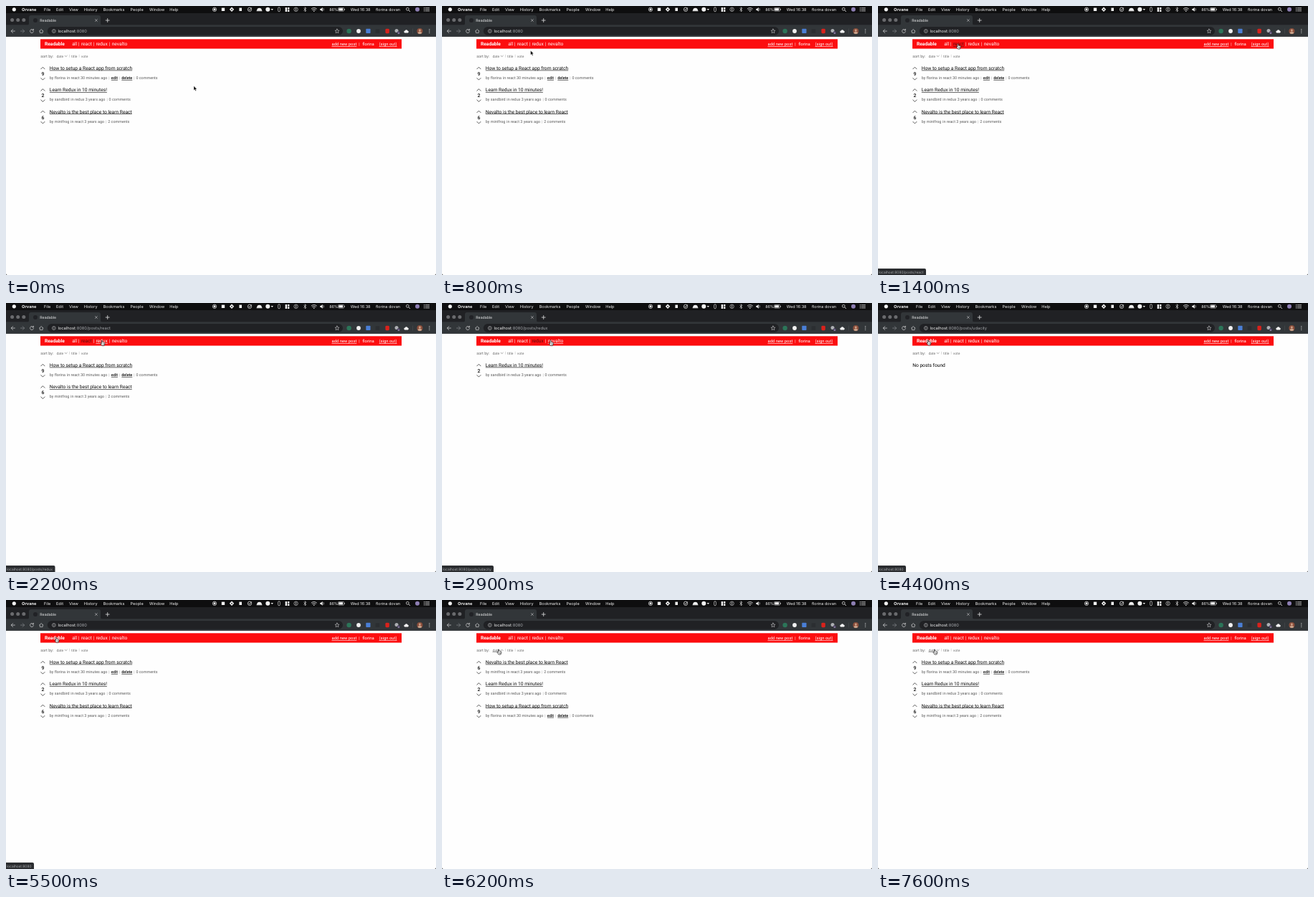
An HTML page that plays this animation: 600x375 px, repeating every 8 s.

```html
<!DOCTYPE html>
<html lang="en">
<head>
<meta charset="utf-8">
<title>Readable</title>
<style>
html, body { margin: 0; width: 100%; height: 100%; overflow: hidden; background: #fefefe; }
svg { display: block; width: 100vw; height: 100vh; }
text { font-family: Roboto, sans-serif; text-rendering: geometricPrecision; }
.ui text, text.ui { font-family: Inter, sans-serif; }
</style>
</head>
<body>
<svg id="stage" viewBox="0 0 600 375" xmlns="http://www.w3.org/2000/svg"></svg>
<script>
const LOOP = 8000, STEP = 100;
const NS = 'http://www.w3.org/2000/svg';
const stage = document.getElementById('stage');

function add(parent, tag, attrs, content) {
  const el = document.createElementNS(NS, tag);
  for (const k in attrs) el.setAttribute(k, attrs[k]);
  if (content !== undefined) el.textContent = content;
  parent.appendChild(el);
  return el;
}
const group = (p, attrs = {}) => add(p, 'g', attrs);
const rect = (p, x, y, width, height, fill, rx = 0) => add(p, 'rect', { x, y, width, height, fill, rx });
const dot = (p, cx, cy, r, fill) => add(p, 'circle', { cx, cy, r, fill });
const ring = (p, cx, cy, r, stroke, w = 0.7) =>
  add(p, 'circle', { cx, cy, r, stroke, fill: 'none', 'stroke-width': w });
const line = (p, d, stroke, w = 0.8) =>
  add(p, 'path', { d, stroke, fill: 'none', 'stroke-width': w, 'stroke-linecap': 'round', 'stroke-linejoin': 'round' });
const shape = (p, d, fill) => add(p, 'path', { d, fill });
const text = (p, x, y, size, fill, str, more = {}) =>
  add(p, 'text', { x, y, 'font-size': size, fill, ...more }, str);

// Text in a group with a thin rule below it, both in the group's colour
function linkText(p, x, y, size, fill, str, more = {}) {
  const g = group(p, { fill });
  const label = add(g, 'text', { x, y, 'font-size': size, ...more }, str);
  const rule = add(g, 'rect', { x, y: y + 0.8, width: label.getComputedTextLength(), height: 0.6 });
  return { g, rule };
}

function drawMenuBar() {
  const g = group(stage, { class: 'ui' }), w = '#f2f2f2';
  rect(g, 0, 0, 600, 10, '#0e0e0f');
  dot(g, 11.3, 4.8, 2.6, w);
  text(g, 22, 6.9, 5.7, w, 'Orvane', { 'font-weight': 700 });
  const menu = { File: 53, Edit: 70, View: 88, History: 108.7, Bookmarks: 135.7, People: 173.5, Window: 200, Help: 228.3 };
  for (const name in menu) text(g, menu[name], 6.9, 5.6, w, name);

  ring(g, 291, 4.8, 2.7, w);
  dot(g, 291, 4.8, 1.5, w);
  rect(g, 300.8, 2.6, 4.4, 4.4, w);
  shape(g, 'M315 1.6l3.2 3.2-3.2 3.2-3.2-3.2z', w);
  dot(g, 315, 4.8, 0.9, '#0e0e0f');
  rect(g, 325.4, 2.6, 3.6, 4.4, w);
  ring(g, 340, 4.8, 2.7, w);
  line(g, 'M338.6 4.8l1.2 1.2 2.6-3.2', w);
  shape(g, 'M350 6.6a3.5 3.8 0 0 1 7 0z', w);
  rect(g, 349.5, 6.3, 8, 1, w, 0.5);
  dot(g, 365.3, 4.8, 3, w);
  shape(g, 'M369.6 4h3.4l-1.7 2z', w);
  add(g, 'rect', { x: 379.6, y: 1.8, width: 2.8, height: 6, rx: 1.4, fill: 'none', stroke: w, 'stroke-width': 0.6 });
  rect(g, 389.7, 2, 2.4, 6, w);
  rect(g, 393, 2, 2.4, 2.6, w);
  rect(g, 393, 5.4, 2.4, 2.6, w);
  ring(g, 404.6, 4.8, 2.7, w, 0.6);
  line(g, 'M404.6 3.4v2.8', w, 0.7);
  line(g, 'M415.7 3.3l3.2 3-1.6 1.7V1.7l1.6 1.6-3.2 3', w, 0.6);
  line(g, 'M426.2 3.9q3.6-3 7.2 0M427.5 5.4q2.3-1.9 4.6 0', w, 0.8);
  dot(g, 429.8, 7.1, 0.8, w);
  shape(g, 'M438.3 3.8h1.4l2-1.7v5.6l-2-1.7h-1.4z', w);
  line(g, 'M443 3.3q1 1.5 0 3', w, 0.6);
  text(g, 451.2, 6.9, 5.4, w, '86%');
  add(g, 'rect', { x: 463.6, y: 2.5, width: 8, height: 4.6, rx: 0.8, fill: 'none', stroke: w, 'stroke-width': 0.5 });
  rect(g, 464.3, 3.2, 5.8, 3.2, w);
  rect(g, 472.2, 4, 0.7, 1.6, w);
  text(g, 480.8, 6.9, 5.6, w, 'Wed 16:38');
  text(g, 516, 6.9, 5.5, w, 'florina dovan');
  ring(g, 560.3, 4.3, 1.9, w);
  line(g, 'M561.8 5.8l1.9 1.9', w);
  dot(g, 574, 4.8, 3, '#8e7fb4');
  line(g, 'M583.2 2.7h1M585.6 2.7h5M583.2 4.8h1M585.6 4.8h5M583.2 6.9h1M585.6 6.9h5', w, 0.7);
}

function drawBrowser() {
  const g = group(stage, { class: 'ui' }), c = '#c9cacc';
  rect(g, 0, 10, 600, 17, '#202124');
  shape(g, 'M29 27q3 0 3-3v-8q0-3 3-3h94q3 0 3 3v8q0 3 3 3z', '#323639');
  rect(g, 0, 26.3, 600, 16.6, '#323639');
  [8.6, 16.7, 24.8].forEach(x => dot(g, x, 19.4, 2.5, '#6a6b6e'));
  dot(g, 41, 20, 3, '#212226');
  text(g, 47.3, 22, 5.2, '#e6e7e8', 'Readable');
  line(g, 'M124.4 18.5l3 3m0-3l-3 3', c, 0.6);
  line(g, 'M139.2 20h5M141.7 17.5v5', '#e0e0e0', 0.8);

  line(g, 'M12.3 35h-5m2.3-2.4l-2.4 2.4 2.4 2.4', c);
  line(g, 'M20.5 35h5m-2.3-2.4l2.4 2.4-2.4 2.4', '#7c7f83');
  line(g, 'M38 33.4a2.5 2.5 0 1 0 .5 2.2M38.4 32.2v1.7h-1.8', c);
  line(g, 'M46.5 35l2.7-2.5 2.7 2.5M47.3 34.6v2.9h3.8v-2.9', c, 0.7);
  rect(g, 57.8, 29.1, 412.2, 11.7, '#202124', 5.85);
  ring(g, 66.8, 35, 2.4, c, 0.6);
  line(g, 'M66.8 34.8v1.3M66.8 33.6v.05', c, 0.6);
  line(g, 'M462 32l.9 2 2.1.2-1.6 1.4.5 2.1-1.9-1.1-1.9 1.1.5-2.1-1.6-1.4 2.1-.2z', c, 0.6);

  dot(g, 478.6, 35, 3.2, '#2c7559');
  dot(g, 492, 35, 2.9, '#f1f1f1');
  rect(g, 502.3, 31.8, 6.2, 6.2, '#4a7fd6', 0.7);
  rect(g, 515.6, 32.2, 5.6, 5.6, '#2b2e31', 0.6);
  rect(g, 529.4, 31.8, 5.4, 6.4, '#d9221c', 1.4);
  dot(g, 545, 34.4, 2.5, '#aeb0b4');
  rect(g, 546, 35.6, 3.8, 3.4, '#4a3f63', 0.6);
  text(g, 546.8, 38.5, 3.2, '#fff', '0');
  shape(g, 'M556.3 37.4a1.5 1.5 0 0 1 .4-2.9a2.1 2.1 0 0 1 3.8 0a1.5 1.5 0 0 1 .3 2.9z', '#f4f4f4');
  rect(g, 567.6, 31.5, 0.4, 7, '#55585c');
  dot(g, 577.4, 35, 4, '#8b4f3c');
  shape(g, 'M574.4 37.7q3-4.6 6 0q-3 2.6-6 0z', '#c9a48c');
  dot(g, 577.4, 34, 1.4, '#d1a389');
  [32.7, 35, 37.3].forEach(y => dot(g, 590.8, y, 0.65, c));

  const url = text(g, 72.4, 37.1, 5.75, '#f1f1f1', 'localhost');
  return add(url, 'tspan', { fill: '#a3a6aa' }, ':8080');
}

function drawHeader() {
  rect(stage, 48, 46.25, 504, 13.25, '#fc0d0f');
  const y = 55.2, w = '#fff', bar = x => text(stage, x, y, 6.4, w, '|');
  text(stage, 54, y, 6.667, w, 'Readable', { 'font-weight': 700 });
  text(stage, 92.2, y, 6.667, w, 'all');
  [100.8, 121.9, 144].forEach(bar);
  const item = (x, s) => linkText(stage, x, y, 6.667, w, s);
  const links = { react: item(104.9, 'react'), redux: item(125.4, 'redux'), udacity: item(147.7, 'nevalto') };
  linkText(stage, 454.5, y, 5.833, w, 'add new post');
  text(stage, 492.2, y, 5.5, w, '|');
  text(stage, 497.3, y, 5.833, w, 'florina');
  linkText(stage, 520.6, y, 5.833, w, '(sign out)');

  const grey = '#757575';
  text(stage, 48.2, 71.6, 5.417, '#666', 'sort by:');
  links.date = linkText(stage, 70.4, 71.5, 5, grey, 'date');
  text(stage, 91, 71.5, 5, grey, 'title');
  text(stage, 104.8, 71.5, 5, grey, 'vote');
  [87.7, 101.6].forEach(x => text(stage, x, 71.3, 4.6, '#999', '|'));
  return links;
}

const posts = [
  { title: 'How to setup a React app from scratch', votes: 9, by: 'florina', when: 'in react 30 minutes ago', end: 141.3, count: 0, mine: true },
  { title: 'Learn Redux in 10 minutes!', votes: 2, by: 'sandbird', when: 'in redux 3 years ago', end: 138.4, count: 0 },
  { title: 'Nevalto is the best place to learn React', votes: 6, by: 'mintfrog', when: 'in react 3 years ago', end: 137, count: 2 }
];

function drawPost(p) {
  const g = group(stage), y = 102.1, grey = '#595959', ink = '#0a0a0a';
  const bar = x => text(g, x, y - 0.2, 5, '#999', '|');
  line(g, 'M48.8 87.8l2.6-2.6 2.6 2.6M48.8 100.5l2.6 2.6 2.6-2.6', '#333', 0.8);
  text(g, 51.4, 97, 6.8, ink, p.votes, { 'text-anchor': 'middle', 'font-weight': 500 });
  linkText(g, 60.8, 88.8, 6.667, ink, p.title);
  text(g, 60.8, y, 5.417, grey, 'by ' + p.by);
  text(g, p.end, y, 5.417, grey, p.when, { 'text-anchor': 'end' });
  let x = p.end + 2;
  bar(x);
  if (p.mine) {
    linkText(g, 146.8, y, 5.417, ink, 'edit', { 'font-weight': 500 });
    bar(157.8);
    linkText(g, 161.3, y, 5.417, ink, 'delete', { 'font-weight': 500 });
    x = 178.2;
    bar(x);
  }
  text(g, x + 3.2, y, 5.417, grey, p.count + ' comments');
  return g;
}

drawMenuBar();
const path = drawBrowser();
const links = drawHeader();
const caret = line(stage, '', '#666', 0.6);
const rows = posts.map(drawPost);
const empty = text(stage, 48.2, 88.9, 6.667, '#000', 'No posts found');

shape(stage, 'M0 375v-2q0 2 2 2zM600 375v-2q0 2-2 2z', '#222');
const bubble = group(stage);
const bubbleBox = add(bubble, 'path', { fill: '#2b2d30' });
const bubbleText = text(bubble, 1, 372.6, 4.9, '#a9abae', '', { class: 'ui' });

const arrow = add(stage, 'path', {
  d: 'M0 0v6l1.4-1.2 1 2.3 1.1-.5-1-2.2h1.9z', fill: '#000', stroke: '#fff', 'stroke-width': 0.4
});
const hand = group(stage);
add(hand, 'path', {
  d: 'M-.6.5q.6-.9 1.2 0v2l2.7.6q.7.3.6 1.1l-.4 1.9-.6 1.4h-2.9l-2-2.7q-.3-.9.6-.8l.8.7z',
  fill: '#fff', stroke: '#000', 'stroke-width': 0.6, 'stroke-linejoin': 'round'
});
line(hand, 'M1 4.6v1.5M1.9 4.6v1.5M2.8 4.6v1.5', '#000', 0.35);

// Pointer stops: time, x, y
const track = [
  [100, 262, 111.5], [1000, 103.6, 55], [1300, 111.5, 52.5], [1700, 111.5, 52.5],
  [2200, 134, 52], [2700, 134, 52], [2900, 151.5, 52], [3200, 155, 52.5],
  [3800, 155, 52.5], [4300, 70, 51.5], [5450, 70, 51.5], [6100, 79, 68.5]
];
const pages = [
  [0, '', [0, 1, 2]], [1600, '/posts/react', [0, 2]], [2500, '/posts/redux', [1]],
  [3400, '/posts/udacity', []], [4600, '', [0, 1, 2]], [6200, '', [2, 1, 0]], [7600, '', [0, 1, 2]]
];
const hints = [
  [0, '', 0, 0], [1100, '/posts/react', 67, 0.5], [1200, '/posts/react', 67, 1], [2000, '/posts/redux', 68.5, 1],
  [2800, '/posts/udacity', 72, 1], [4200, '', 39, 1], [5900, '', 39, 0.5], [6000, '', 0, 0]
];
const focus = [[0, ''], [1400, 'react'], [2300, 'redux'], [3200, 'udacity'], [4400, '']];
const zones = {
  home: [53, 48, 83, 58], react: [104.4, 48, 121, 58], redux: [125, 48, 142.5, 58],
  udacity: [147.3, 48, 170, 58], date: [70, 66, 86, 74]
};

const current = (list, t) => list.filter(k => k[0] <= t).pop();
const show = (el, on) => el.setAttribute('display', on ? 'inline' : 'none');

function pointer(t) {
  const i = track.findIndex(k => k[0] > t);
  if (i === 0) return track[0].slice(1);
  if (i < 0) return track[track.length - 1].slice(1);
  const [a, x0, y0] = track[i - 1], [b, x1, y1] = track[i];
  const u = (t - a) / (b - a), e = u * u * (3 - 2 * u);
  return [x0 + (x1 - x0) * e, y0 + (y1 - y0) * e];
}

function render(ms) {
  const t = Math.floor((ms % LOOP) / STEP) * STEP;
  const [x, y] = pointer(t);
  const hover = Object.keys(zones).find(k => {
    const [l, top, r, b] = zones[k];
    return x >= l && x <= r && y >= top && y <= b;
  });

  const [, url, order] = current(pages, t);
  path.textContent = ':8080' + url;
  rows.forEach((row, i) => {
    const slot = order.indexOf(i);
    show(row, slot >= 0);
    row.setAttribute('transform', `translate(0 ${slot * 30.4})`);
  });
  show(empty, !order.length);
  caret.setAttribute('d', order[0] === 2 ? 'M82.2 70.6l1.5-1.5 1.5 1.5' : 'M82.2 69.2l1.5 1.5 1.5-1.5');

  const dark = current(focus, t)[1];
  for (const k in links) {
    show(links[k].rule, k === hover);
    if (k !== 'date') links[k].g.setAttribute('fill', k === dark ? '#5e0a0b' : '#fff');
  }

  const [, hint, w, alpha] = current(hints, t);
  bubble.setAttribute('opacity', alpha);
  bubbleBox.setAttribute('d', `M0 366h${Math.max(0, w - 2)}q2 0 2 2v7H0z`);
  bubbleText.textContent = 'localhost:8080' + hint;

  for (const el of [arrow, hand]) el.setAttribute('transform', `translate(${x.toFixed(2)} ${y.toFixed(2)})`);
  show(arrow, !hover);
  show(hand, hover);
}

const start = performance.now();
function tick() {
  render(performance.now() - start);
  requestAnimationFrame(tick);
}
render(0);
requestAnimationFrame(tick);
</script>
</body>
</html>
```
